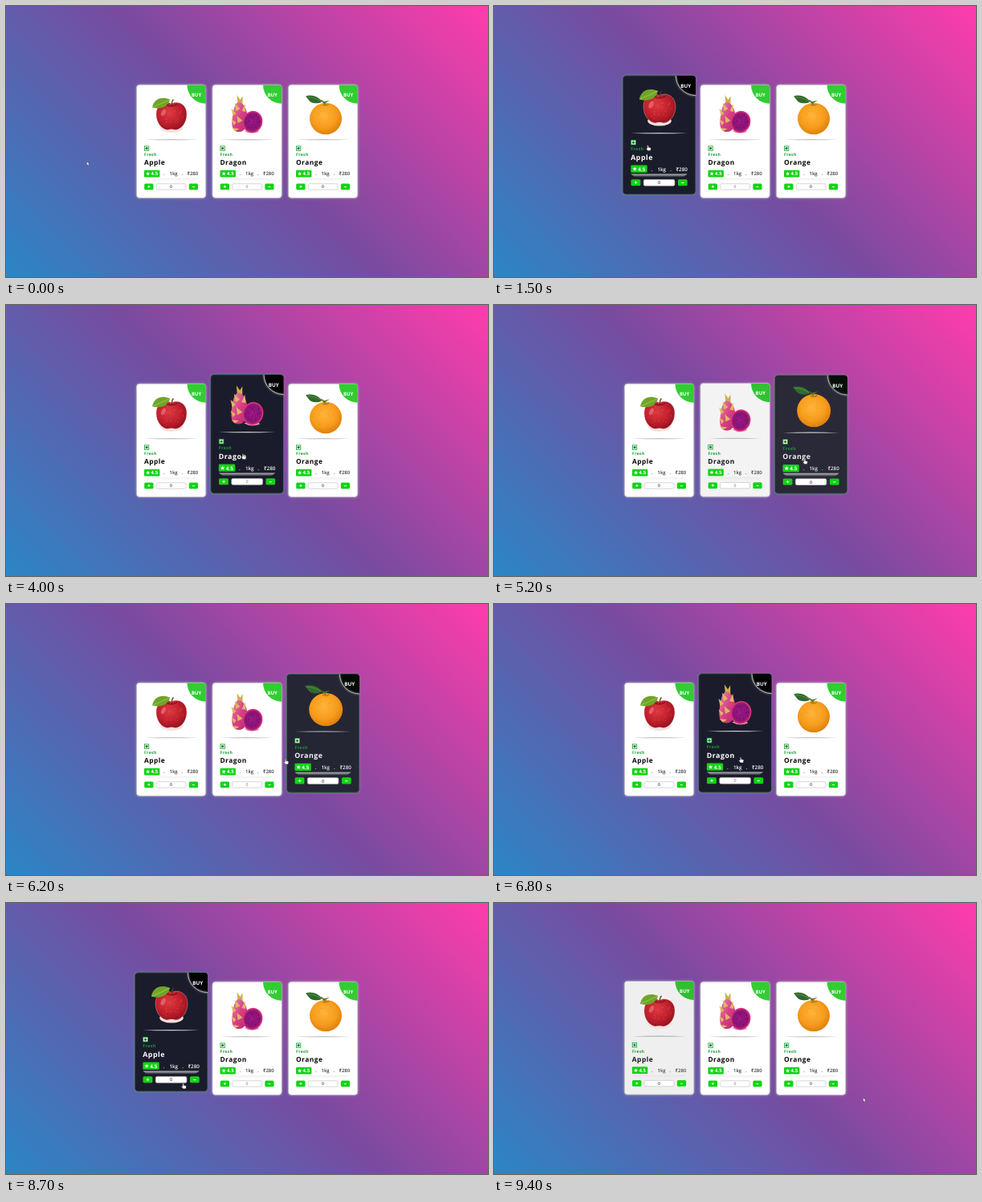
These frames come from a looping animation (600 by 338 pixels, 9.5 s). An HTML page:

```html
<!DOCTYPE html>
<html lang="en">
<head>
<meta charset="utf-8">
<title>Fruit cards</title>
<style>
  html, body { margin: 0; width: 100%; height: 100%; overflow: hidden; }
  body { background: linear-gradient(225deg, #ff3cac 0%, #784ba0 50%, #2b86c5 100%); }
  svg { display: block; width: 100vw; height: 100vh; }
  text { font-family: "Open Sans", "Noto Sans", sans-serif; font-weight: 600; text-rendering: geometricPrecision; }
  .glow { fill: var(--glow); filter: blur(1.4px); }
  .body { fill: var(--bg); stroke: var(--edge); stroke-width: .8; }
  .corner { fill: var(--corner); }
  .arc { fill: none; stroke: #d4d4d8; stroke-width: .8; opacity: var(--h); }
  .halo { fill: none; stroke: #fff; stroke-width: 1.6; filter: blur(1px); opacity: calc(var(--h) * .35); }
  .buy { font-size: 6px; font-weight: 700; fill: #fff; text-anchor: middle; }
  .rule { fill: var(--rule); opacity: .85; }
  .strip { fill: url(#fade); opacity: calc(.4 + var(--h) * .45); }
  .fresh { font-size: 5.1px; font-weight: 700; letter-spacing: .35px; fill: var(--fresh); }
  .name { font-size: 8.4px; font-weight: 700; letter-spacing: .5px; fill: var(--ink); }
  .info { font-size: 6px; fill: var(--soft); }
  .rate { font-size: 6px; font-weight: 700; fill: #fff; }
  .btn { fill: #10d414; }
  .sign { stroke: #fff; stroke-width: .9; }
  .qty { fill: #fff; stroke: #bdbdbd; stroke-width: .6; }
  .num { font-size: 5.2px; text-anchor: middle; }
</style>
</head>
<body>
<svg viewBox="0 0 600 338" preserveAspectRatio="none">
  <defs>
    <radialGradient id="red" cx=".42" cy=".38" r=".65">
      <stop offset="0" stop-color="#dd3a42"/><stop offset=".6" stop-color="#c01f2c"/><stop offset="1" stop-color="#93121f"/>
    </radialGradient>
    <radialGradient id="amber" cx=".45" cy=".4" r=".65">
      <stop offset="0" stop-color="#ffb53a"/><stop offset=".6" stop-color="#f79c1c"/><stop offset="1" stop-color="#d67a0a"/>
    </radialGradient>
    <linearGradient id="pink" x2="1" y2="1">
      <stop offset="0" stop-color="#e58aa0"/><stop offset=".5" stop-color="#d83f86"/><stop offset="1" stop-color="#b52a6c"/>
    </linearGradient>
    <radialGradient id="flesh">
      <stop offset="0" stop-color="#a3198c"/><stop offset=".75" stop-color="#8a1478"/><stop offset="1" stop-color="#a81c72"/>
    </radialGradient>
    <linearGradient id="fade" x2="0" y2="1">
      <stop offset="0" stop-color="#ddd"/><stop offset="1" stop-color="#ddd" stop-opacity="0"/>
    </linearGradient>
  </defs>
  <g id="cards"></g>
  <g id="arrow"><path d="M0 0V4.8L1.2 3.8L2 5.4L2.8 5L2.1 3.5H3.6Z" fill="#fff" stroke="#333" stroke-width=".4"/></g>
  <g id="hand"><path d="M-.7 .4Q0-.4 .7 .4V2.6L3.3 3.2Q4 3.5 3.8 4.6L3.2 7H-.2L-2.2 4.2Q-2 3.2-.7 4Z" fill="#fff" stroke="#222" stroke-width=".5"/></g>
</svg>
<script>
const LOOP = 9500, STEP = 100, FADE = 500, GAP = 94.5;
const CX = 205.6, CY = 168.8;

// Seeds and spots share one small generator.
function seeded(seed) {
  return () => (seed = (seed * 16807) % 2147483647) / 2147483647;
}
function dots(n, x, y, r, size, color, seed) {
  const rnd = seeded(seed);
  let out = '';
  for (let i = 0; i < n; i++) {
    const a = rnd() * 6.283, d = Math.sqrt(rnd()) * r;
    out += `<circle cx="${(x + d * Math.cos(a)).toFixed(1)}" cy="${(y + d * Math.sin(a)).toFixed(1)}" r="${size}" fill="${color}"/>`;
  }
  return out;
}

const apple = `
  <ellipse cx="206" cy="152" rx="14" ry="6" fill="#f6e2e0"/>
  <path d="M206 122C212 118 225 121 225 135C225 146 218 154 211 154.500Q206 153 201 154.500C194 154 187 146 187 135C187 121 200 118 206 122Z" fill="url(#red)" stroke="#f3d0d0" stroke-opacity=".5" stroke-width=".7"/>
  <path d="M200 123Q206 127 213 122.500" stroke="#7a1019" stroke-width="1.2" fill="none"/>
  <path d="M206.500 124Q206 119 208.500 116.500" stroke="#5b3a1d" stroke-width="1.3" fill="none"/>
  <ellipse cx="196" cy="133" rx="2.400" ry="4.500" transform="rotate(25 196 133)" fill="#f08a8a" opacity=".55"/>
  ${dots(26, 206, 138, 15, .45, '#e8706a', 7)}
  <path d="M182 126.500C184 116 193 112 204 116.500C203 123 195 130.500 182 126.500Z" fill="#6fa52a"/>
  <path d="M183 126Q193 122 204 116.500" stroke="#a8cc58" stroke-width=".8" fill="none"/>`;

const dragon = `
  <path d="M194 123L193 111L197 117L200 112L200 123Z" fill="#c9b04c"/>
  <path d="M194 120C200 119 206 127 206 139C206 151 202 158 194 157C188 156 186 150 187 142C188 133 189 123 194 120Z" fill="url(#pink)"/>
  <path d="M188 137L186 128L192 134ZM192 131L190 121L197 128ZM199 131L203 122L204 132ZM189 149L186 141L192 145ZM194 146L193 137L200 143ZM191 156L187 152L196 153Z" fill="#dfb565"/>
  <path d="M202 156Q210 161 221 157L214 151Z" fill="#e8a0aa"/>
  <g transform="rotate(15 212.500 144.500)">
    <ellipse cx="212.500" cy="144.500" rx="12.300" ry="13.800" fill="#d9367f"/>
    <ellipse cx="212.500" cy="144.500" rx="10.900" ry="12.300" fill="url(#flesh)"/>
  </g>
  ${dots(48, 212.5, 144.5, 9.8, .4, '#4d0a4b', 19)}`;

const orange = `
  <ellipse cx="209" cy="140.500" rx="20" ry="19.700" fill="url(#amber)"/>
  ${dots(48, 209, 141, 17.5, .4, '#e08c17', 31)}
  <path d="M205 123Q209 125 213 122.500" stroke="#9b7a19" stroke-width="1.300" fill="none"/>
  <path d="M208.500 123Q208 120 203 117.500" stroke="#4f5f24" stroke-width="1.100" fill="none"/>
  <path d="M184 112.500C191 110 200 112.500 204.500 119.500C198 123 190 121 188 117.500Z" fill="#2f6b2c"/>
  <path d="M186 113.500Q196 114 203.500 119" stroke="#7ea35a" stroke-width=".6" fill="none"/>
  <path d="M204.500 120L214 117.500L207 122Z" fill="#4a7a35"/>`;

const items = [
  { name: 'Apple', art: apple, num: '#444', hover: [[870, 3220], [7540, 9060]] },
  { name: 'Dragon', art: dragon, num: '#999', hover: [[3250, 4840], [6200, 7540]] },
  { name: 'Orange', art: orange, num: '#444', hover: [[4850, 6170]] }
];

// Pointer stops: time, x, y.
const path = [
  [0, 100.5, 194], [300, 84, 190], [870, 163, 179], [1500, 191.5, 173.5],
  [3220, 250, 180], [4000, 295, 185.5], [4840, 347, 190], [5200, 386.5, 191.5],
  [5700, 398, 194], [6170, 350, 193], [6800, 307, 191], [7540, 252, 202],
  [7900, 234.5, 207], [8400, 216, 212], [9060, 226, 240], [9200, 300, 271], [9400, 459.5, 243]
];

function star(x, y, r) {
  let pts = '';
  for (let i = 0; i < 10; i++) {
    const a = i * Math.PI / 5, d = i % 2 ? r * .42 : r;
    pts += `${(x + d * Math.sin(a)).toFixed(2)},${(y - d * Math.cos(a)).toFixed(2)} `;
  }
  return `<polygon points="${pts}" fill="#fff"/>`;
}

const box = (cls, x, y, w, h, r) =>
  `<rect class="${cls}" x="${x}" y="${y}" width="${w}" height="${h}" rx="${r}"/>`;

function card({ name, art, num }) {
  const arc = 'M225.500 98.500A23.300 23.300 0 0 0 248.800 121.800';
  return `<g>
    ${box('glow', 161.6, 97.4, 88, 142.8, 5)}
    ${box('body', 162.4, 98.2, 86.4, 141.2, 4)}
    ${art}
    <path class="corner" d="${arc}V102Q248.800 98.500 245 98.500Z"/>
    <path class="halo" d="${arc}"/><path class="arc" d="${arc}"/>
    <text class="buy" x="237.200" y="112.700">BUY</text>
    <path class="rule" d="M172 166.700Q205.600 165.600 239 166.700Q205.600 167.800 172 166.700Z"/>
    <rect x="172.400" y="174.900" width="5.400" height="5.400" fill="#fff" stroke="#159a2c" stroke-width=".8"/>
    <circle cx="175.100" cy="177.600" r="1.600" fill="#0c8a20"/>
    <text class="fresh" x="172" y="187.200">Fresh</text>
    <text class="name" x="171.900" y="198.300">${name}</text>
    ${box('btn', 172, 204.7, 19.4, 8.8, 1.2)}
    ${star(176.6, 209.2, 2.8)}
    <text class="rate" x="180.500" y="211.400">4.5</text>
    <text class="info" x="196" y="211.400">.</text>
    <text class="info" x="203.500" y="211.400">1kg</text>
    <text class="info" x="218.500" y="211.400">.</text>
    <text class="info" x="225.500" y="211.400">₹280</text>
    <path class="strip" d="M172 215H239L234 219H177Z"/>
    ${box('btn', 172.2, 221.4, 11.3, 7.8, 1.5)}
    <path class="sign" d="M176.200 225.300H179.600M177.900 223.700V226.900"/>
    ${box('qty', 187.2, 221.7, 36.8, 7.4, 1.6)}
    <text class="num" x="205.600" y="227.300" fill="${num}">0</text>
    ${box('btn', 227.8, 221.4, 11.2, 7.8, 1.5)}
    <path class="sign" d="M231.900 225.600H234.900"/>
  </g>`;
}

const root = document.getElementById('cards');
root.innerHTML = items.map(card).join('');
const groups = [...root.children];
const arrow = document.getElementById('arrow');
const hand = document.getElementById('hand');

// cubic-bezier(.25, .1, .25, 1)
function ease(x) {
  if (x <= 0) return 0;
  if (x >= 1) return 1;
  const curve = (u, a, b) => 3 * u * (1 - u) ** 2 * a + 3 * u * u * (1 - u) * b + u ** 3;
  let lo = 0, hi = 1;
  for (let i = 0; i < 20; i++) {
    const mid = (lo + hi) / 2;
    if (curve(mid, .25, .25) < x) lo = mid; else hi = mid;
  }
  return curve(lo, .1, 1);
}

const mix = (a, b, k) => `rgba(${a.map((v, i) => +(v + (b[i] - v) * k).toFixed(3)).join()})`;
const tones = {
  '--bg': [[255, 255, 255, 1], [27, 28, 43, 1]],
  '--edge': [[182, 174, 192, 1], [58, 120, 86, 1]],
  '--glow': [[185, 180, 200, .45], [140, 150, 165, .4]],
  '--corner': [[50, 205, 50, 1], [2, 2, 5, 1]],
  '--ink': [[8, 8, 8, 1], [255, 255, 255, 1]],
  '--soft': [[60, 60, 60, 1], [245, 245, 245, 1]],
  '--fresh': [[20, 160, 50, 1], [24, 150, 58, 1]],
  '--rule': [[160, 160, 160, 1], [235, 235, 235, 1]]
};

function pose(t) {
  items.forEach(({ hover }, i) => {
    const h = hover.reduce((sum, [on, off]) => sum + ease((t - on) / FADE) - ease((t - off) / FADE), 0);
    const g = groups[i];
    g.setAttribute('transform',
      `translate(${GAP * i + CX} ${CY - 7.9 * h}) scale(${1 + .05 * h}) translate(${-CX} ${-CY})`);
    g.style.setProperty('--h', h);
    for (const key in tones) g.style.setProperty(key, mix(...tones[key], h));
  });

  let k = 1;
  while (k < path.length - 1 && path[k][0] < t) k++;
  const [t0, x0, y0] = path[k - 1], [t1, x1, y1] = path[k];
  const f = Math.min(1, (t - t0) / (t1 - t0));
  const at = `translate(${x0 + (x1 - x0) * f} ${y0 + (y1 - y0) * f})`;
  const over = items.some(c => c.hover.some(([on, off]) => t >= on && t < off));
  arrow.setAttribute('transform', at);
  hand.setAttribute('transform', at);
  arrow.style.display = over ? 'none' : '';
  hand.style.display = over ? '' : 'none';
}

const start = performance.now();
function tick() {
  const t = (performance.now() - start) % LOOP;
  pose(Math.floor(t / STEP) * STEP);
  requestAnimationFrame(tick);
}
tick();
</script>
</body>
</html>
```
